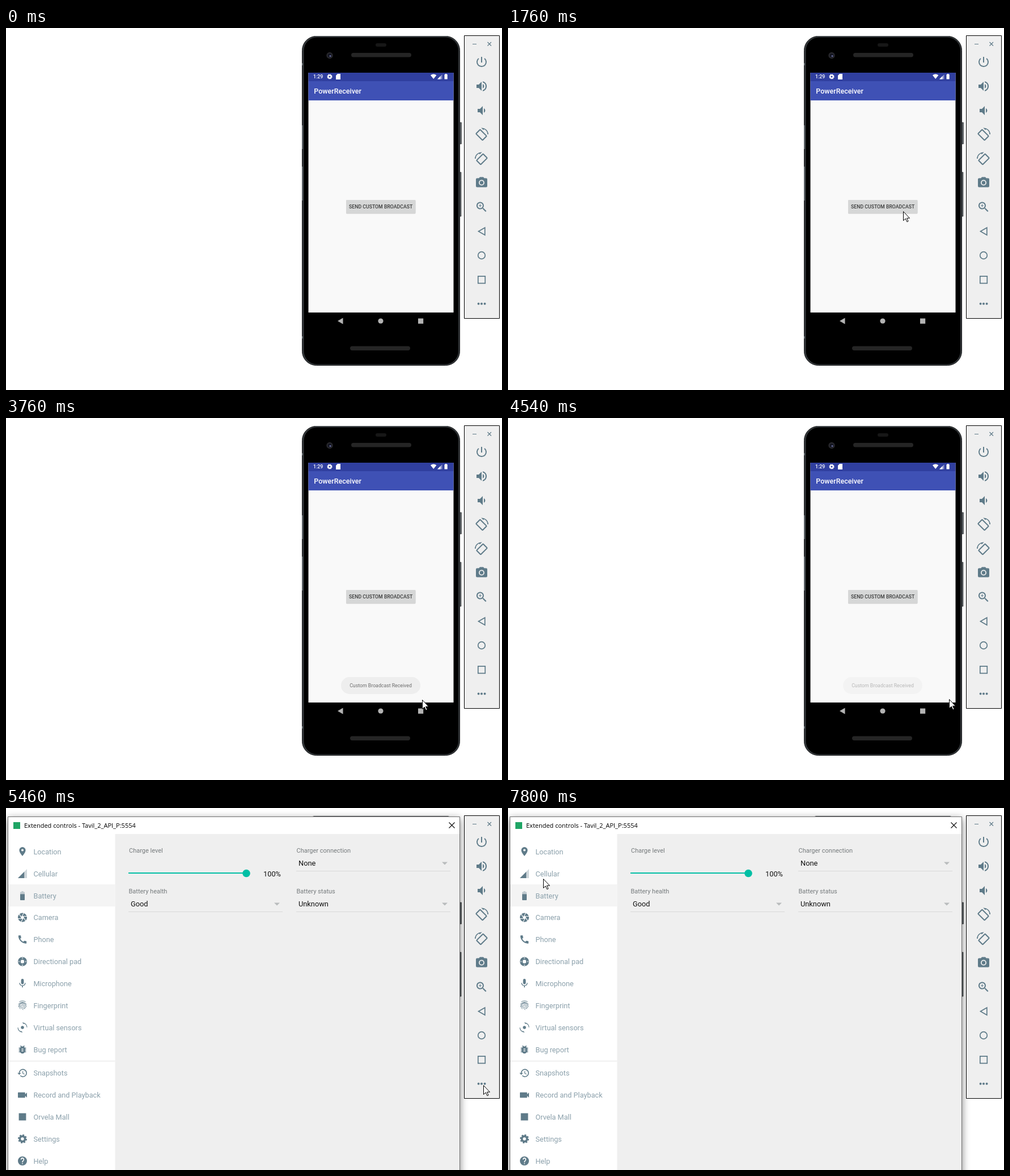
Recreate the animation shown at these times as an HTML page. Size 875 by 640 pixels, loop 8 s.

```html
<!DOCTYPE html>
<html lang="en">
<head>
<meta charset="utf-8">
<title>Broadcast demo</title>
<style>
html, body { margin: 0; width: 100%; height: 100%; overflow: hidden; background: #fff; }
svg { display: block; width: 875px; height: 640px; font-family: Roboto, sans-serif; }
.ico { fill: #5f7b89; fill-rule: evenodd; }
.line { fill: none; stroke: #5f7b89; stroke-width: 1.7; }
.menu { font-size: 12.7px; fill: #8ba0ab; }
.label { font-size: 11px; fill: #757a7c; }
.value { font-size: 12.8px; fill: #111; }
.window { filter: drop-shadow(0 4px 7px rgba(0, 0, 0, .5)); }
</style>
</head>
<body>
<svg viewBox="0 0 875 640">
  <g id="phone">
    <path d="M800 167h3.5v38H800zM800 255h3v78h-3z" fill="#5d6468" stroke="#222" stroke-width=".6"/>
    <rect x="522.5" y="14.5" width="278" height="582" rx="25" fill="#34383b" stroke="#161718"/>
    <rect x="525.5" y="16.5" width="272.5" height="578" rx="23"/>
    <path d="M543 14.5H780" stroke="#5a5e61"/>
    <path d="M523 62v4M523 172v42M523 245v60M523 545v4" stroke="#737b80" stroke-width="1.4"/>
    <circle cx="571" cy="48.5" r="5.7" fill="#27272b"/>
    <circle cx="571" cy="48.5" r="3.2" fill="#11131f"/>
    <circle cx="572" cy="49.5" r="1.5" fill="#666b9c"/>
    <rect x="652" y="27" width="19" height="6" rx="3" fill="#171717"/>
    <rect x="609" y="44" width="106" height="7.5" rx="3.7" fill="#252525"/>
    <rect x="607" y="562.5" width="106" height="7.5" rx="3.7" fill="#252525"/>
    <path d="M533.5 79h256v424h-256z" fill="#f9f9f9"/>
    <path d="M533.5 79h256v15h-256z" fill="#303f9f"/>
    <path d="M533.5 94h256v34h-256z" fill="#3f51b5"/>
    <g fill="#fff">
      <text x="542" y="89.2" font-size="8.8" font-weight="500">1:29</text>
      <text x="543.3" y="115.5" font-size="12.5" font-weight="500">PowerReceiver</text>
      <g id="statusGear"></g>
      <path d="M585 81h5v10h-8v-7zM749 83.5q5.2-3.8 10.4 0L754.2 90zM761 90.5l5.5-5.5v5.5zM773.5 82h1.4v-1h2.4v1h1.4v8.5h-5.2z"/>
      <path d="M761 90.5l8.5-8.5v8.5z" opacity=".45"/>
    </g>
    <rect x="600" y="305" width="122.5" height="23.5" rx="1.5" opacity=".16"/>
    <rect x="600" y="304" width="122.5" height="23.3" rx="1" fill="#d6d7d7"/>
    <clipPath id="buttonClip"><rect x="600" y="304" width="122.5" height="23.3"/></clipPath>
    <circle id="ripple" cx="694" cy="318" clip-path="url(#buttonClip)"/>
    <text x="661.2" y="318.8" font-size="8.72" font-weight="500" text-anchor="middle" fill="#3a3b3b">SEND CUSTOM BROADCAST</text>
    <g id="toast">
      <rect x="591" y="458" width="140" height="30" rx="15" fill="#eee"/>
      <text x="661" y="476.2" font-size="8.75" text-anchor="middle" fill="#6c6c6c">Custom Broadcast Received</text>
    </g>
    <g fill="#b3b3b3">
      <path d="M585 518l9.5-5.5v11zM727 513.5h9.2v9.2H727z"/>
      <circle cx="661" cy="518" r="4.6"/>
    </g>
  </g>

  <g id="dialog">
    <path class="window" d="M3.5 15.5h797V700H3.5z" fill="#fff" stroke="#707070"/>
    <path d="M192.5 46H800v594H192.500z" fill="#efefef"/>
    <path d="M4 135h188.5v39H4zM4 446h188.5v3H4z" fill="#f4f4f4"/>
    <path d="M13 25h12v12H13z" fill="#1fa565"/>
    <text x="32" y="34.8" font-size="11" font-family="Open Sans, sans-serif">Extended controls - Tavil_2_API_P:5554</text>
    <path d="M781.5 25.5l10 10m0-10l-10 10" stroke="#111" stroke-width="1.2"/>
    <g id="menu"></g>
    <path d="M216 115h208" stroke="#00bfa5" stroke-width="2"/>
    <circle cx="424" cy="115.5" r="6.8" fill="#00bfa5"/>
    <text class="label" x="217" y="79">Charge level</text>
    <text class="value" x="454" y="120.5">100%</text>
    <g id="fields"></g>
  </g>

  <g id="panel">
    <path d="M808.5 13.5h62v500h-62z" fill="#efefef" stroke="#000"/>
    <path d="M823 28.5h7M849.5 25l6.5 6.5m0-6.5l-6.5 6.5" stroke="#5f7b89" stroke-width="1.2"/>
    <rect id="hover" x="821" y="471" width="36.5" height="33" rx="3" fill="#d5d5d5"/>
    <g id="tools"></g>
    <path class="line" d="M833.5 359.5l11.3-6.5v13zM832.8 438.8h12.5v12.5h-12.5z"/>
    <circle class="line" cx="839" cy="402" r="6.3"/>
    <path class="ico" d="M831.6 487.500a2 2 0 1 0 4 0 2 2 0 1 0-4 0zM837 487.500a2 2 0 1 0 4 0 2 2 0 1 0-4 0zM842.600 487.500a2 2 0 1 0 4 0 2 2 0 1 0-4 0z"/>
  </g>

  <circle id="click" r="12" fill="#ece72c" opacity=".82"/>
  <path id="cursor" d="M.5.5v16l3.700-3.500 2.700 5.700 2.200-1-2.600-5.500h5z" fill="#fff" stroke="#000"/>
</svg>
<script>
const $ = id => document.getElementById(id);
const shape = (d, more = '') => `<path d="${d}" ${more}/>`;
const ring = (r, w, more = '') =>
  `<circle cx="12" cy="12" r="${r}" fill="none" stroke="#5f7b89" stroke-width="${w}" ${more}/>`;
const icon = (x, y, size, body) =>
  `<g class="ico" transform="translate(${x} ${y}) scale(${size}) translate(-12 -12)">${body}</g>`;

const gear = ring(5.7, 4.6) + ring(8.4, 3.2, 'stroke-dasharray="3.6 3"');
const sweep = 'M16.5 2.5A10.500 10.500 0 0 1 22.300 11.500H24A12 12 0 0 0 11.300 0l3.800 3.800z';
const rotate = flip => `<g transform="translate(12 12) scale(${flip} 1) translate(-12 -12)">
  <rect class="line" x="-5.200" y="-8.200" width="10.400" height="16.400" rx="1"
    style="stroke-width:2" transform="translate(11.500 12.500) rotate(-45)"/>${shape(sweep)}</g>`;

const tools = [
  [60, shape('M13 3h-2v10h2zM17.8 5.200l-1.400 1.400A7 7 0 0 1 19 12a7 7 0 1 1-11.400-5.400L6.200 5.200A9 9 0 1 0 17.800 5.200z')],
  [103, shape('M3 9v6h4l5 5V4L7 9zM16.500 12A4.500 4.500 0 0 0 14 8v8A4.500 4.500 0 0 0 16.500 12zM14 3.200v2.100a7 7 0 0 1 0 13.400v2.100a9 9 0 0 0 0-17.600z')],
  [146, shape('M18.500 12A4.500 4.500 0 0 0 16 8v8A4.500 4.500 0 0 0 18.500 12zM5 9v6h4l5 5V4L9 9z')],
  [188.5, rotate(1)],
  [231.5, rotate(-1)],
  [273.5, shape('M9 2L7.200 4H4a2 2 0 0 0-2 2v12a2 2 0 0 0 2 2h16a2 2 0 0 0 2-2V6a2 2 0 0 0-2-2h-3.200L15 2zM12 7a5 5 0 1 1 0 10 5 5 0 0 1 0-10zM12 8.800a3.200 3.200 0 1 0 0 6.400 3.200 3.200 0 0 0 0-6.400z')],
  [316.5, shape('M15.500 14h-.8l-.3-.3A6.500 6.500 0 1 0 13.700 14.400l.3.300v.8l5 5 1.500-1.500zM9.500 14a4.500 4.500 0 1 1 0-9 4.500 4.500 0 0 1 0 9zM12 10h-2v2H9v-2H7V9h2V7h1v2h2z')]
];
$('tools').innerHTML = tools.map(([y, body]) => icon(839, y, 1, body)).join('');
$('statusGear').innerHTML = icon(571, 86, .46, gear.replace(/#5f7b89/g, '#fff'));

const menu = [
  [77, 'Location', shape('M12 2a7 7 0 0 0-7 7c0 5.250 7 13 7 13s7-7.750 7-13a7 7 0 0 0-7-7zM12 11.500a2.500 2.500 0 1 1 0-5 2.500 2.500 0 0 1 0 5z')],
  [116, 'Cellular', shape('M2 22h20V2z', 'opacity=".3"') + shape('M2 22h14V8z')],
  [155, 'Battery', shape('M7 9V4h3V2h4v2h3v5z', 'opacity=".35"') + shape('M7 8.500h10V21q0 1-1 1H8q-1 0-1-1z')],
  [193.5, 'Camera', shape('M9.400 10.500l4.800-8.300A10 10 0 0 0 5.700 4.200l3.600 6.400zM21.500 9a10 10 0 0 0-6-6.300L11.900 9zM21.800 10h-7.500l5 8.700A10 10 0 0 0 21.800 10zM8.500 12l-3.900-6.700A10 10 0 0 0 2.200 14h7.500zM2.500 15a10 10 0 0 0 6 6.300L12.100 15zM13.700 15l-3.900 6.800a10 10 0 0 0 8.500-2l-3.700-6.400z')],
  [232.5, 'Phone', shape('M20 15.400c-1.200 0-2.400-.2-3.500-.6a1 1 0 0 0-1 .3l-1.600 2c-2.800-1.400-5.500-4-6.900-6.900l2-1.700a1 1 0 0 0 .2-1C8.800 6.400 8.600 5.200 8.600 4a1 1 0 0 0-1-1H4.200Q3 3 3 4c0 9.300 7.700 17 17 17q1 0 1-1.200v-3.400a1 1 0 0 0-1-1z')],
  [271.5, 'Directional pad', ring(7, 6) + shape('M12 3l1.800 2.200h-3.600zM12 21l1.800-2.200h-3.600zM3 12l2.200-1.800v3.600zM21 12l-2.200-1.800v3.600z', 'fill="#fff"')],
  [310, 'Microphone', shape('M12 14a3 3 0 0 0 3-3V5a3 3 0 0 0-6 0v6a3 3 0 0 0 3 3zM17.300 11a5.300 5.300 0 0 1-10.600 0H5a7 7 0 0 0 6 6.700V21h2v-3.300A7 7 0 0 0 19 11z')],
  [349, 'Fingerprint', shape('M5 4q7-4 14 0M3 9.500q9-9 18 0M4 16c-2-12 17-13 16-1q-1 3-4 1c-2-2 0-5-4-5-6 0-3 8 2 10.500M7 20c-5-16 11-14 10.500-6M12 14q0 5 6 5', 'class="line" style="stroke-width:1.200"')],
  [388, 'Virtual sensors', '<circle cx="12" cy="12" r="3.400"/>' + [0, 180].map(a =>
    shape(sweep, `transform="rotate(${a} 12 12) translate(1.200 1.200) scale(.9)"`)).join('')],
  [427, 'Bug report', shape('M20 8h-2.800a6 6 0 0 0-1.800-2L17 4.400 15.600 3l-2.200 2.200a6 6 0 0 0-2.800 0L8.400 3 7 4.400 8.600 6a6 6 0 0 0-1.800 2H4v2h2.100L6 12H4v2h2l.1 2H4v2h2.800a6 6 0 0 0 10.400 0H20v-2h-2.100l.1-2h2v-2h-2l-.1-2H20zM14 16h-4v-2h4zM14 12h-4v-2h4z')],
  [468.5, 'Snapshots', shape('M13 3a9 9 0 0 0-9 9H1l4 4 4-4H6a7 7 0 1 1 2 5l-1.400 1.400A9 9 0 1 0 13 3zM12 8v5l4.300 2.500.7-1.200-3.500-2V8z')],
  [507.5, 'Record and Playback', shape('M18 10.500V7a1 1 0 0 0-1-1H3a1 1 0 0 0-1 1v10a1 1 0 0 0 1 1h14a1 1 0 0 0 1-1v-3.500l4 4v-11z')],
  [546, 'Orvela Mall', shape('M4 4h16v16H4z')],
  [585, 'Settings', gear],
  [624, 'Help', shape('M12 2a10 10 0 1 0 0 20 10 10 0 0 0 0-20zM13 19h-2v-2h2zM15 11.300l-.9.900C13.500 12.900 13 13.500 13 15h-2c0-1.600.5-2.600 1.200-3.300l1.200-1.300A2 2 0 1 0 10 9H8a4 4 0 1 1 7 2.300z')]
];
$('menu').innerHTML = menu.map(([y, name, body]) =>
  icon(29, y, .8, body) + `<text class="menu" x="48.5" y="${y + 4.5}">${name}</text>`).join('');

const fields = [
  [512, 79, 'Charger connection', 'None'],
  [216, 151, 'Battery health', 'Good'],
  [512, 151, 'Battery status', 'Unknown']
];
$('fields').innerHTML = fields.map(([x, y, name, value]) => `
  <text class="label" x="${x + .5}" y="${y}">${name}</text>
  <text class="value" x="${x + 4}" y="${y + 23}">${value}</text>
  <path d="M${x} ${y + 32.5}h272" stroke="#d9d9d9"/>
  <path d="M${x + 257} ${y + 16.5}h10l-5 5z" fill="#b9bcbd"/>`).join('');

// Pointer moves: start, end, steps, points spread evenly over the move
const moves = [
  [440, 1220, 11, [782, 614], [776, 560], [766, 490], [752, 438], [734, 407]],
  [1280, 1990, 10, [729, 397], [708, 352], [697, 324], [694, 318]],
  [2750, 2980, 4, [697, 326], [728, 405]],
  [3070, 3530, 7, [734, 420], [742, 452], [722, 478], [696, 487]],
  [3700, 3760, 2, [716, 494], [734, 498]],
  [3930, 3990, 2, [716, 495], [696, 489]],
  [4160, 4930, 11, [702, 491], [745, 498], [800, 497], [836, 492], [841, 489]],
  [5000, 5001, 2, [842, 490], [842, 490]],
  [6550, 7320, 11, [835, 486], [730, 435], [520, 345], [340, 290], [260, 262]],
  [7400, 7800, 6, [225, 235], [140, 175], [90, 140], [62, 125]]
];
const clamp = v => Math.max(0, Math.min(1, v));
const ramp = (t, a, b) => clamp((t - a) / (b - a));
const show = (id, on) => $(id).style.display = on ? '' : 'none';

function pointerAt(t) {
  const move = moves.filter(m => m[0] <= t).pop();
  if (!move) return null;
  const [from, to, steps, ...pts] = move;
  const p = Math.floor(ramp(t, from, to) * (steps - 1) + .001) / (steps - 1);
  const i = Math.min(pts.length - 2, Math.floor(p * (pts.length - 1)));
  const f = p * (pts.length - 1) - i;
  return pts[i].map((v, k) => Math.round(v + (pts[i + 1][k] - v) * f));
}

function draw(t) {
  const tip = pointerAt(t);
  show('cursor', tip);
  if (tip) $('cursor').setAttribute('transform', `translate(${tip})`);

  const onButton = t >= 2220 && t < 2360;
  const onMore = t >= 5250 && t < 5460;
  show('click', onButton || onMore);
  $('click').setAttribute('cx', onButton ? 694 : 840.5);
  $('click').setAttribute('cy', onButton ? 318 : 489);
  show('hover', onMore);
  show('dialog', t >= 5460);

  $('ripple').setAttribute('r', 100 * ramp(t, 2220, 2520));
  $('ripple').setAttribute('opacity', .07 * (1 - ramp(t, 2480, 2800)));
  $('toast').setAttribute('opacity', ramp(t, 2480, 2720) * (1 - ramp(t, 4300, 4750)));
}

function tick() {
  draw(performance.now() % 8000);
  requestAnimationFrame(tick);
}
tick();
</script>
</body>
</html>
```
